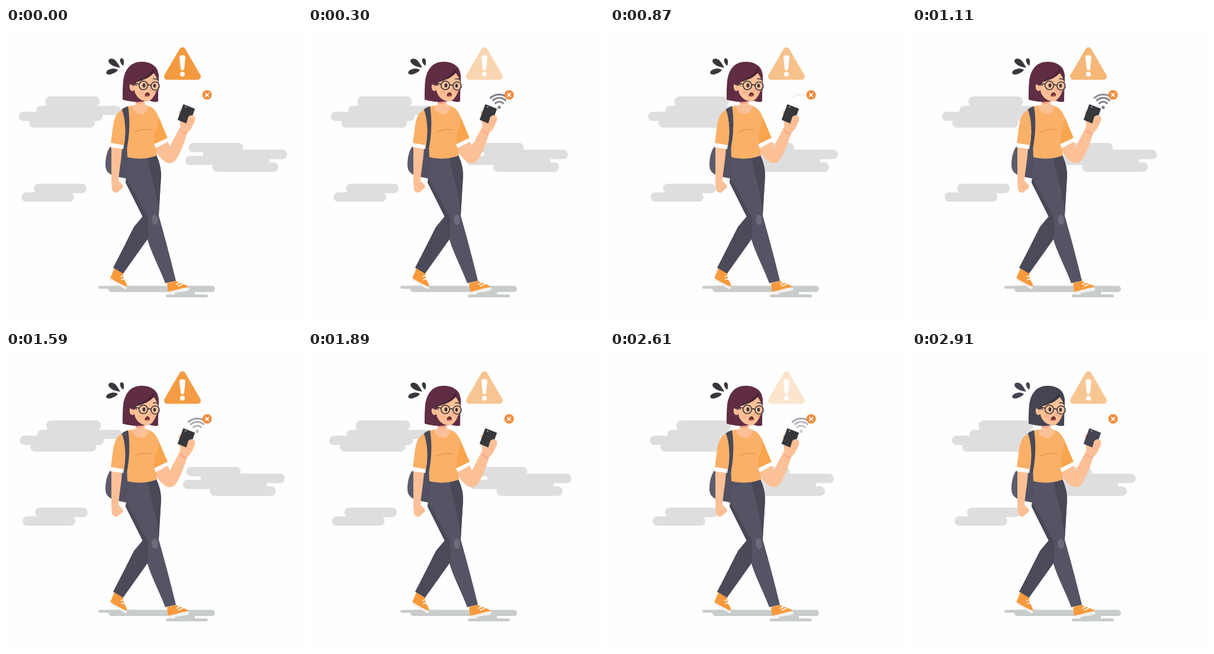
An HTML page for the animation above (2.94 s loop, 500 by 500 pixels).

```html
<!DOCTYPE html>
<html lang="en">
<head>
<meta charset="utf-8">
<title>Lost signal</title>
<style>
  html, body { margin: 0; width: 100%; height: 100%; overflow: hidden; background: #fefefe; }
  svg { display: block; width: 100vw; height: 100vh; }

  .cloud { fill: #dedede; animation: drift 2940ms linear infinite; }
  .left { --far: 46px; }
  .right { --far: -97px; }
  @keyframes drift {
    0%, 55.3%, 55.8% { transform: translateX(0); }
    27.6%, 83.3%, 100% { transform: translateX(var(--far)); }
  }

  .alert { animation: blink 2940ms linear infinite; }
  @keyframes blink {
    0%, 16.3%, 34%, 54.4%, 68%, 81.6%, 95.2% { opacity: 1; }
    8.2%, 25.2%, 44.2%, 61.2%, 74.8%, 88.4% { opacity: .2; }
    100% { opacity: .45; }
  }

  .wifi > * { animation: signal 980ms linear calc(var(--i) * 35ms) infinite backwards; }
  .wifi path { fill: none; stroke: #82828e; stroke-width: 3.2; stroke-linecap: round; }
  @keyframes signal {
    0%, 82%, 100% { opacity: 0; }
    3%, 42% { opacity: 1; }
  }

  .hair, .dark { fill: currentColor; animation: tint 2940ms step-end infinite; }
  .hair { --warm: #602d44; }
  .dark { --warm: #37383c; }
  @keyframes tint {
    0%, 80% { color: var(--warm); }
    71.4%, 96% { color: #444453; }
  }

  .skin { fill: #fcc097; }
  .shirt { fill: #fab067; }
  .line { fill: none; stroke: #3a333e; stroke-linecap: round; stroke-linejoin: round; }
  .lace { fill: none; stroke: #fff; stroke-width: 1.8; stroke-linecap: round; }
</style>
</head>
<body>
<svg viewBox="0 0 500 500">
  <g class="cloud left">
    <rect x="66" y="115.5" width="92.5" height="17" rx="8.5"/>
    <rect x="51" y="131.5" width="143" height="15.5" rx="7.7"/>
    <rect x="21.5" y="141.5" width="141.5" height="15.5" rx="7.7"/>
    <rect x="39" y="152" width="111.5" height="16.5" rx="8.2"/>
    <path d="M72 124H154V140H60ZM56 140H158V152H56Z"/>
    <rect x="47" y="263" width="89" height="16" rx="8"/>
    <rect x="26" y="277.5" width="89" height="16" rx="8"/>
    <path d="M56 270H108V285H56Z"/>
  </g>
  <g class="cloud right">
    <rect x="308.5" y="194" width="92" height="16" rx="8"/>
    <rect x="333" y="205.5" width="142" height="16" rx="8"/>
    <rect x="303" y="216" width="142" height="15.5" rx="7.7"/>
    <rect x="348.5" y="227" width="111.5" height="16" rx="8"/>
    <path d="M333 200H400V222H333ZM356 214H445V236H356Z"/>
  </g>

  <g fill="#c8cccb">
    <rect x="156" y="435.5" width="60" height="5" rx="2.5"/>
    <rect x="173" y="435.5" width="180" height="10.5" rx="5.2"/>
    <rect x="270" y="450" width="71" height="5" rx="2.5"/>
    <path d="M285 445H319V451H285Z"/>
  </g>

  <!-- backpack -->
  <path fill="#5c5b6b" d="M184 193C173 199 168 215 168 231C168 244 176 248 187 251L207 255V200Z"/>
  <path fill="#525162" d="M193 200L209 200V255L190 251C195 235 194 217 193 200Z"/>

  <!-- legs and shoes -->
  <path fill="#4b4a59" d="M231 318L216 336C208 352 193 382 181 405L197 416L239 357L252 322Z"/>
  <path fill="#f89a3c" d="M183 406L198 415L199 424C203 430 205 434 204 438L176 423Z"/>
  <path fill="#f1f1f1" d="M176 422C184 428 194 434 204 437Q205 441 202 441.500L175 426Z"/>
  <path class="lace" d="M194 420L200 418M195 425L201 423"/>
  <path fill="#555465" d="M207 217C218 220 240 220 254 215C259 226 262 237 262 249L258 317C267 349 278 389 287 427L269 431C259 405 246 380 240 361C238 348 237 333 232 321L202 261C204 245 207 231 207 217Z"/>
  <path fill="#494857" d="M239 219L254 215C259 226 262 237 262 249L258 315C257 290 246 254 239 219Z"/>
  <path fill="#494857" d="M203 254L209 264C220 283 230 302 240 320L240 361C238 348 237 333 232 321L202 261Z"/>
  <ellipse cx="251.500" cy="324" rx="5.200" ry="8.800" fill="#6c6b7b" transform="rotate(-6 251.500 324)"/>
  <path fill="#f89a3c" d="M272 431L287 427C292 431 304 432 309 438V442L274 447Z"/>
  <path fill="#f1f1f1" d="M273.500 445.500C286 444 298 438 309 438Q311 442 307 444L276 449Q273 449 273.500 445.500Z"/>
  <path class="lace" d="M288 433L294 429.500M291 436L298 433"/>

  <!-- far arm -->
  <path class="skin" d="M252 202L272 189L277 200L294 167L307 174C302 192 294 212 287 223Q280 231 270 227C260 220 254 212 252 202Z"/>
  <path fill="#f49b84" d="M295 172L306 177L304 181L293.500 175Z" opacity=".55"/>

  <!-- torso -->
  <path class="shirt" d="M206 133C220 128 237 130 246 134C255 140 260 154 264 165L273 186L252 196L251 182L255 215C240 222 220 222 205 218L204 195L199 155Z"/>
  <path fill="#f8a54d" d="M259 153L273 186L251 196L251 181Z"/>
  <path fill="#fff" d="M250 196.500L273 185.500L275 191L253 203Z"/>
  <path fill="none" stroke="#ec9340" stroke-width="1.300" stroke-linecap="round" d="M217 176Q231 169 244 172"/>
  <path class="skin" d="M212 133C219 128 232 128 241 131Q239 144 229 146Q217 144 212 133Z"/>
  <path class="skin" d="M219 115H233L235 132Q227 138 219 131Z"/>
  <path fill="#f3a087" d="M219 121L233 124Q229 130 219 127Z"/>
  <path fill="#4a4958" d="M195 138Q200 134 206 132C209 148 210 177 204 204L199 199C203 178 202 155 195 138Z"/>

  <!-- near arm -->
  <path class="skin" d="M178 200L196 203C195 222 191 241 190 258L197 265Q199 269 195 272L188 278Q181 279 179 273L178 258Z"/>
  <path fill="none" stroke="#f3a98a" d="M188 266L190 272M193 266L195 270"/>
  <path class="shirt" d="M196 138C186 143 183 153 181 164L177 195L199 199C203 178 202 155 196 138Z"/>
  <path fill="#fff" d="M176.500 194L199 198L198 204.500L176.500 201.500Z"/>

  <!-- phone and hand -->
  <path class="skin" d="M292 142Q293 138 298 141L312 148Q320 149 319 157L313 170L306 178L295 172Z"/>
  <path class="dark" stroke="currentColor" stroke-width="2" stroke-linejoin="round" d="M300 130L318 137L309 162L291 154.500Z"/>
  <circle cx="303.500" cy="133.500" r="1.400" fill="#8c8c96"/>
  <path class="skin" d="M308 150Q313 145 318 149Q321 152 318 158L312 169L303 171Q298 168 304 163Z"/>
  <path fill="none" stroke="#f1a386" d="M309 156L315 158M306 162L312 164"/>

  <!-- head -->
  <path class="hair" d="M197 121C197 109 197 101 198 89C201 69 211 57 229 57C244 57 255 64 257 75C259 87 257 101 257 124Q250 126 243 123L222 125Q207 124 197 121Z"/>
  <path class="skin" d="M217 92C228 90 241 83 249 73C255 79 258 88 257 99C255 112 249 121 239 124C228 124 219 116 217 106Z"/>
  <ellipse class="skin" cx="213.500" cy="99" rx="4.800" ry="7.500"/>
  <path fill="none" stroke="#ef9f83" d="M212 96Q216 99 214 103"/>
  <g class="hair">
    <path d="M207 94C211 72 227 63 249 68L252 73C245 83 233 88 220 91L217 98Z"/>
    <path d="M244 122Q251 116 254 106L257 108V124Q249 126 244 122Z"/>
    <path d="M247 67Q255 68 258 79L258 91Q254 82 247 72Z"/>
    <path fill="#000" opacity=".2" d="M217 91C231 86 243 79 249 68L252 73C245 83 233 89 220 92Z"/>
  </g>
  <g fill="#f59a82" opacity=".4">
    <ellipse cx="228" cy="109" rx="4" ry="2.500"/>
    <ellipse cx="250" cy="109" rx="3" ry="2.200"/>
  </g>
  <g class="line">
    <circle cx="232" cy="97" r="7.300" stroke-width="1.600"/>
    <circle cx="252" cy="98" r="7" stroke-width="1.600"/>
    <path stroke-width="1.600" d="M239.500 96.500Q242 95 245 97M216 92L224.500 95M219 94L220 97M226 88Q230 84 236 85M249 86Q254 85 257 88"/>
    <path stroke="#e8937a" d="M243 102L245 106L242 107"/>
  </g>
  <g fill="#3a333e">
    <ellipse cx="233" cy="97" rx="2.400" ry="3.400"/>
    <ellipse cx="251" cy="97.500" rx="2.200" ry="3.300"/>
  </g>
  <path fill="#6f3236" d="M234.500 116Q234 109 239 108.500Q243.500 109 243 115Q239 112 234.500 116Z"/>
  <path fill="#c9564f" d="M235.500 115.500Q239 112.500 242.500 115Q240 117 235.500 115.500Z"/>

  <!-- surprise marks -->
  <g class="dark">
    <path d="M189 71C184 66 172 69 169.500 74C168 79 175 80 180 77Q186 75 189 71Z"/>
    <path d="M193 67C184 66 174 62 173 56C173 51 181 50 186 56Q190 61 193 67Z"/>
    <path d="M198 64C193 60 191 54 194 51.500C198 50 201 55 198 64Z"/>
  </g>

  <g class="alert">
    <path fill="#f39a3f" stroke="#f39a3f" stroke-width="11" stroke-linejoin="round" d="M298 38L323.500 82H272.500Z"/>
    <path fill="#fefefe" d="M293 49Q293 46 298 46Q303 46 303 49L301 69Q300.500 71.500 298 71.500Q295.500 71.500 295 69Z"/>
    <circle cx="298" cy="78" r="4" fill="#fefefe"/>
  </g>

  <g class="wifi">
    <circle style="--i:0" cx="323" cy="134" r="2.700" fill="#82828e"/>
    <path style="--i:1" d="M316.600 127A9.500 9.500 0 0 1 329.400 127"/>
    <path style="--i:2" d="M312.600 122A15.500 15.500 0 0 1 333.400 122"/>
    <path style="--i:3" d="M308.300 118A22 22 0 0 1 337.700 118"/>
  </g>
  <circle cx="339.700" cy="113" r="8" fill="#f28c3d"/>
  <path stroke="#fff" stroke-width="1.800" stroke-linecap="round" d="M337 110.300L342.400 115.700M342.400 110.300L337 115.700"/>
</svg>
</body>
</html>
```
